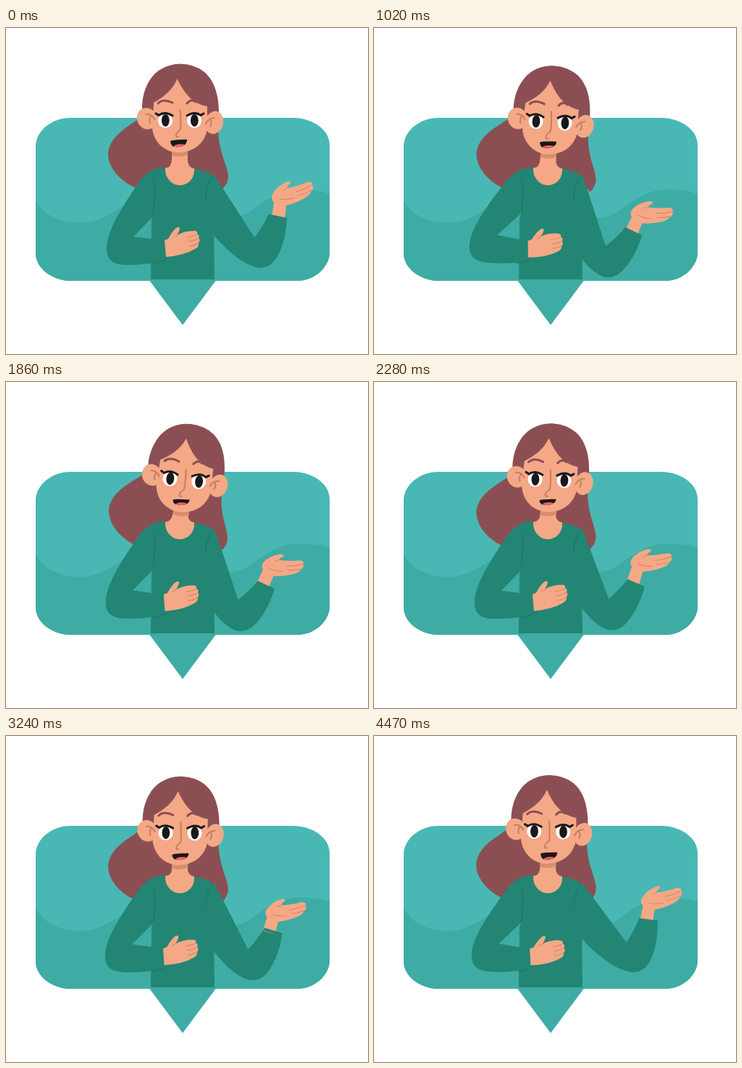
An HTML page for the animation above (4500 ms loop, 500 by 450 pixels).

```html
<!DOCTYPE html>
<html lang="en">
<head>
<meta charset="utf-8">
<title>Talking woman</title>
<style>
  html, body { margin: 0; width: 100%; height: 100%; overflow: hidden; background: #fff; }
  svg { display: block; width: 100%; height: 100%; }
  .line { fill: none; stroke-linecap: round; stroke-linejoin: round; }
  .teal { fill: #3eaca4; }
  .hair { fill: #8b4f53; }
  .skin { fill: #f4a886; }
  .shirt { fill: #238573; }
  .white { fill: #fff; }
  .dark { fill: #1b1718; }
  .fold { stroke: #1b7463; stroke-width: 1; }
  .mark { stroke: #c67e61; stroke-width: 2; }
  .thin { stroke: #cf8468; stroke-width: 1; }
  .brow { stroke: #8b4f53; stroke-width: 3; }
  .lash { stroke: #1b1718; stroke-width: 3; }
</style>
</head>
<body>
<svg viewBox="0 0 500 450" preserveAspectRatio="none">
  <defs>
    <clipPath id="bubble">
      <path d="M89 124H398C425 125 447 141 447 162V311C446 332 424 349 403 349H88C62 348 41 331 41 311V162C42 141 64 124 89 124Z"/>
    </clipPath>
    <clipPath id="mouthClip"><path id="mouthShape"/></clipPath>
    <g id="eye">
      <ellipse class="white" rx="10" ry="10.500"/>
      <ellipse class="dark" cx=".3" rx="5.400" ry="8.600"/>
    </g>
  </defs>

  <g clip-path="url(#bubble)">
    <rect x="40" y="120" width="410" height="232" fill="#49b8b4"/>
    <path class="teal" d="M40 234C48 256 72 269 101 269C128 269 142 257 160 247C205 225 255 255 290 260C305 263 320 264 336 254C358 238 376 223 406 223C424 223 438 226 448 229V350H40Z"/>
  </g>
  <path class="teal" d="M198 348.500H290L244 410Z"/>

  <path id="backHair" class="hair"/>
  <path id="neck" class="skin"/>
  <path id="neckShade" fill="#d98d6e"/>

  <path class="shirt" d="M219 192Q207 193 201 197L198 220L204 255L201 264L200 347H288L287 275L289 206Q279 197 260 194Q259 210 240 216Q221 212 219 192Z"/>
  <path class="skin" d="M228 189Q225 193 220 193C219 207 229 217 240 217C252 217 261 207 260 194Q254 193 252 188Z"/>

  <g id="armL">
    <path class="shirt" d="M206 194Q192 201 184 212C168 236 152 260 144 281Q139 294 139 304C139 322 150 327 168 327C188 327 207 325 222 319L219 293Q197 291 176 288L206 257Q210 222 206 194Z"/>
    <path class="line fold" d="M205 325Q214 323 222 319"/>
    <path class="skin" d="M219 293L224 291Q230 280 235 276Q240 273 240 277Q239 282 236 286Q246 280 260 280Q265 280 264 284Q268 286 266 290Q269 293 266 297Q267 302 261 305Q246 314 221 316Z"/>
    <path class="line thin" d="M236 286Q234 288 231 289M250 289Q258 288 264 285M252 295Q259 294 265 291M253 301Q260 301 265 297"/>
  </g>
  <path class="line fold" d="M204 208Q206 220 205 236Q205 248 203 258"/>

  <g id="armR">
    <path class="shirt" d="M284 203L289 205L343 289Q353 277 363 257L388 262C387 288 380 309 371 321Q363 331 350 331C329 328 308 310 287 286L275 270L276 235Q276 208 284 203Z"/>
    <g id="handR">
      <path class="skin" d="M367 261L370 241Q365 235 368 230Q373 219 388 212Q394 211 393 214Q388 218 388 221Q401 219 416 213Q424 211 423 217Q426 221 422 225Q420 231 412 235Q400 242 387 245L385 264Z"/>
      <path class="line thin" d="M388 221Q386 223 383 224M378 236Q388 238 398 235M401 226Q412 223 422 217M404 231Q414 229 422 224"/>
    </g>
    <path class="shirt" d="M361 260.500L363 257L388 262L387 267Z"/>
  </g>
  <path class="line fold" d="M285 206Q275 219 276 236"/>

  <g id="head">
    <path class="hair" d="M188 114C187 89 197 68 212 58Q225 49.500 241 49.500Q260 50 273 60C288 72 294 93 294 118L278 130H203Z"/>
    <ellipse class="skin" cx="194.500" cy="125" rx="13.500" ry="15" transform="rotate(-22 194.500 125)"/>
    <ellipse class="skin" cx="287.500" cy="130.500" rx="12.500" ry="16" transform="rotate(14 287.500 130.500)"/>
    <path class="skin" d="M236.500 70C230 86 218 95 204 103L202 139C205 160 221 172 239 172C259 171 274 160 278 140V108C259 105 247 92 236.500 70Z"/>
    <path class="line mark" d="M193 119Q201 118 205 126M200 122Q197 126 199 131M288 124Q280 124 276 132M282 126Q285 131 282 136"/>
    <path class="line brow" d="M210 104Q217 97 230 103M250 104Q256 97 262 102"/>
    <use href="#eye" x="220" y="127.500"/>
    <use href="#eye" x="260" y="127.500"/>
    <path class="line lash" d="M207 118L211 120.500Q219 114.500 230 121M250 121Q261 114.500 269 120.500L273 118"/>
    <path class="line mark" d="M240.500 113Q242 128 241 140Q234 146 235 149Q236 151 238 150"/>
    <g id="mouth">
      <path id="lips" class="dark"/>
      <ellipse id="tongue" cx="241" rx="10" ry="4.500" fill="#ef5f69" clip-path="url(#mouthClip)"/>
    </g>
  </g>
</svg>
<script>
const LOOP = 4500;
const get = id => document.getElementById(id);
const put = (id, name, value) => get(id).setAttribute(name, value);

const span = (t, a, b) => Math.min(1, Math.max(0, (t - a) / (b - a)));
const ease = (t, a, b) => (1 - Math.cos(Math.PI * span(t, a, b))) / 2;
// Rises from a to a peak at b, then sinks until c.
const hump = (t, a, b, c) => ease(t, a, b) - ease(t, b, c);

// Returns a mapper that carries a point along with the head.
function mover(angle, dy) {
  const r = angle * Math.PI / 180, c = Math.cos(r), s = Math.sin(r);
  return (x, y) => {
    const px = x - 240, py = y - 190;
    return (240 + px * c - py * s).toFixed(2) + " " + (190 + px * s + py * c + dy).toFixed(2);
  };
}

function drawHead(t) {
  // Lean right, left, then right again; lift once, sink, and slowly recover.
  const tilt = 7.5 * hump(t, 650, 1450, 2800) - 5.5 * hump(t, 2250, 2800, 3300) + 5.2 * hump(t, 3100, 3700, 4800);
  const drop = -4.3 * hump(t, 0, 600, 1100) + 7.6 * ease(t, 700, 1500) - 3.2 * ease(t, 2200, 4500);
  const h = mover(tilt, drop), l = mover(tilt * 0.55, drop);

  put("head", "transform", `translate(0 ${drop}) rotate(${tilt} 240 190)`);
  put("backHair", "d",
    `M${h(188, 121)}C${h(172, 136)} ${l(145, 145)} ${l(141, 172)}` +
    `C${l(140, 191)} ${l(156, 211)} ${l(180, 221)}L215 208L285 208L${l(299, 222)}` +
    `Q${l(307, 215)} ${l(307, 204)}C${l(305, 187)} ${h(294, 172)} ${h(293, 140)}L${h(280, 110)}L${h(205, 110)}Z`);
  put("neck", "d",
    `M${h(229, 160)}L${h(251, 160)}L${h(251, 174)}Q250 188 255 194L240 214L224 194Q230 188 ${h(229, 174)}Z`);
  put("neckShade", "d", `M${h(229, 162)}L${h(251, 162)}L${h(251, 175)}Q${h(241, 180)} ${h(229, 176)}Z`);
}

function drawMouth(t) {
  const open = 9 + Math.cos(2 * Math.PI * t / LOOP), shift = ease(t, 2300, 3600);
  const lips = `M227 157Q229 155 250 154.500Q250 ${154 + open * 0.75} 243 ${155 + open * 0.9}` +
    `Q236 ${156 + open} 230 ${155 + open * 0.9}Q227 ${155 + open * 0.6} 227 157Z`;
  put("lips", "d", lips);
  put("mouthShape", "d", lips);
  put("tongue", "cy", 155.5 + open);
  put("mouth", "transform", `translate(${2.5 * shift} ${2 * shift - 0.7})`);
}

function drawArms(t) {
  const left = 4.6 * hump(t, 0, 620, 2300) + 2.3 * ease(t, 2000, 4400);
  const right = 15.2 * ease(t, 480, 1080) - 19.2 * span(t, 1600, 4470) ** 1.3;
  put("armL", "transform", `rotate(${left} 205 200)`);
  put("armR", "transform", `rotate(${right} 286 206)`);

  // The hand bends at the wrist and draws back a little while the arm is low.
  const bend = 5.5 * hump(t, 650, 1450, 2200) - 1.5 * ease(t, 1800, 2300) + 8.5 * ease(t, 2900, 3700);
  const back = 5 * ease(t, 600, 1300) + 3 * hump(t, 2900, 3700, 4400) - 2 * ease(t, 3800, 4470);
  const rise = 3 * hump(t, 1600, 2400, 3200) - 3 * hump(t, 3000, 3700, 4470);
  put("handR", "transform",
    `translate(${376 - back} ${257 - rise}) rotate(${bend}) scale(${1 - back * 0.007}) translate(-376 -257)`);
}

function draw(t) {
  drawHead(t);
  drawMouth(t);
  drawArms(t);
}

const start = performance.now();
function tick() {
  draw((performance.now() - start) % LOOP);
  requestAnimationFrame(tick);
}
draw(0);
requestAnimationFrame(tick);
</script>
</body>
</html>
```
